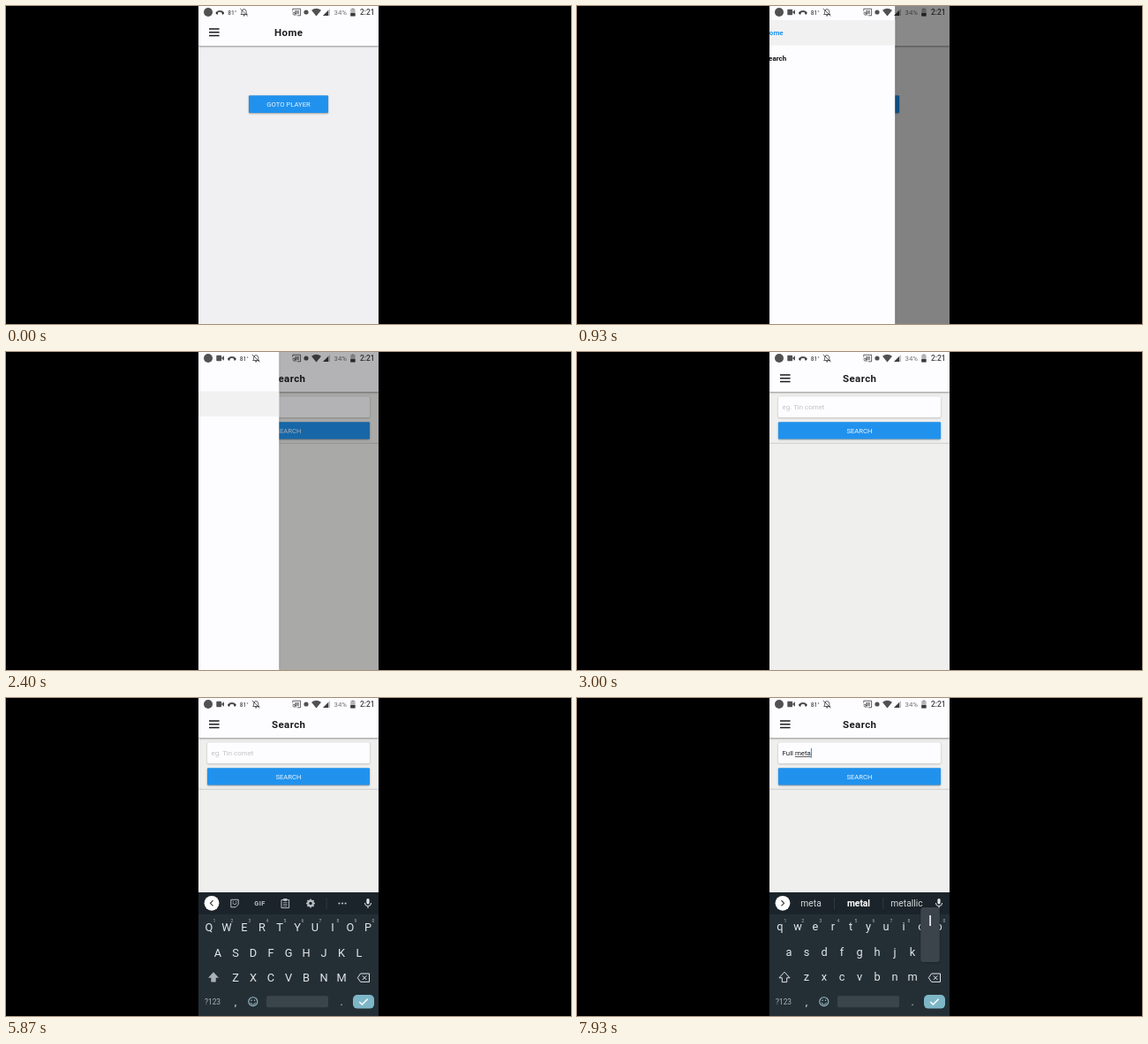
Write an HTML page with a canvas that moves like this. It is 640x360 px and loops after 8000 ms.

```html
<!DOCTYPE html>
<html lang="en">
<head>
<meta charset="utf-8">
<title>Phone search demo</title>
<style>
  html, body { margin: 0; width: 100%; height: 100%; overflow: hidden; background: #000; }
  canvas { display: block; width: 100%; height: 100%; }
</style>
</head>
<body>
<canvas id="stage"></canvas>
<script>
const LOOP = 8000, W = 640, H = 360;
const LEFT = 218, RIGHT = 422, DRAWER = 158;
const BLUE = '#2092ee', PAPER = '#fdfcfe', INK = '#1d1d1f';
const STATUS = 'rgba(0,0,0,.68)';
const KEY = '#e2e6e8', DIM = '#a9b1b5', STRIP = '#1b242a', BOARD = '#242f35';

const canvas = document.getElementById('stage');
const dpr = window.devicePixelRatio || 1;
canvas.width = W * dpr;
canvas.height = H * dpr;
const c = canvas.getContext('2d');

const clamp = v => Math.max(0, Math.min(1, v));
const easeOut = v => 1 - Math.pow(1 - clamp(v), 3);

// Critically damped approach from 0 to 1
function spring(ms, rate) {
  if (ms <= 0) return 0;
  const x = ms / 1000 * rate, left = (1 + x) * Math.exp(-x);
  return left < 0.004 ? 1 : 1 - left;
}

function rect(x, y, w, h, fill, r = 0) {
  c.fillStyle = fill;
  c.beginPath();
  c.roundRect(x, y, w, h, r);
  c.fill();
}

function text(str, x, y, size, fill, { weight = 400, align = 'left', gap = 0 } = {}) {
  c.font = `${weight} ${size}px Roboto, sans-serif`;
  c.letterSpacing = gap + 'px';
  c.textAlign = align;
  c.fillStyle = fill;
  c.fillText(str, x, y);
  c.letterSpacing = '0px';
}

function trace(points, close) {
  c.beginPath();
  for (let i = 0; i < points.length; i += 2) c.lineTo(points[i], points[i + 1]);
  if (close) c.closePath();
}

function line(points, color, width = 1, close = false) {
  trace(points, close);
  c.strokeStyle = color;
  c.lineWidth = width;
  c.stroke();
}

function poly(points, fill) {
  trace(points, true);
  c.fillStyle = fill;
  c.fill();
}

function disc(x, y, r, fill) {
  c.fillStyle = fill;
  c.beginPath();
  c.arc(x, y, r, 0, Math.PI * 2);
  c.fill();
}

function ring(x, y, r, color, width = 1, from = 0, to = Math.PI * 2) {
  c.strokeStyle = color;
  c.lineWidth = width;
  c.beginPath();
  c.arc(x, y, r, from, to);
  c.stroke();
}

function shadowed(blur, drop, alpha, draw) {
  c.save();
  c.shadowColor = `rgba(0,0,0,${alpha})`;
  c.shadowBlur = blur * dpr;
  c.shadowOffsetY = drop * dpr;
  draw();
  c.restore();
}

function statusBar(t) {
  const push = easeOut((t - 40) / 210);
  const x = 13.6 * push;
  disc(229, 7, 5, STATUS);
  if (push > 0) {
    c.globalAlpha = push;
    rect(238.3, 3.8, 5.8, 6.4, STATUS, 0.7);
    poly([244.3, 6.4, 247, 4.2, 247, 9.8, 244.3, 7.6], STATUS);
    c.globalAlpha = 1;
  }
  ring(242.3 + x, 10.2, 4.3, STATUS, 2, Math.PI * 1.13, Math.PI * 1.87);
  line([238.1 + x, 7.6, 239.6 + x, 9.4], STATUS, 1.6);
  line([246.5 + x, 7.6, 245 + x, 9.4], STATUS, 1.6);
  text('81°', 251.2 + x, 9.5, 6.6, STATUS, { weight: 500 });

  const b = 269.6 + x;
  line([b - 3.6, 9.5, b - 2.6, 8.3, b - 2.6, 6, b - 1.3, 3.8, b + 1.3, 3.8,
    b + 2.6, 6, b + 2.6, 8.3, b + 3.6, 9.5], STATUS, 0.9, true);
  line([b - 4.4, 2.8, b + 4.2, 11.4], STATUS, 0.9);
  disc(b, 10.7, 0.9, STATUS);

  line([324.8, 5.5, 324.8, 3.2, 333.6, 3.2, 333.6, 10.8, 330, 10.8], STATUS, 0.9);
  rect(327, 4.8, 5, 4.4, 'rgba(0,0,0,.4)');
  ring(324.6, 10.8, 2, STATUS, 0.9, -Math.PI / 2, 0);
  ring(324.6, 10.8, 3.8, STATUS, 0.9, -Math.PI / 2, 0);
  disc(340, 7, 2.6, STATUS);

  c.fillStyle = STATUS;
  c.beginPath();
  c.moveTo(351.5, 11.4);
  c.lineTo(346, 4.7);
  c.quadraticCurveTo(351.5, 0.9, 357, 4.7);
  c.fill();
  poly([359, 11, 367, 11, 367, 3], 'rgba(0,0,0,.25)');
  poly([359, 11, 365, 11, 365, 5], STATUS);
  text('34%', 371.6, 10, 7.8, 'rgba(0,0,0,.55)');
  rect(391.6, 2.4, 2.6, 1.4, 'rgba(0,0,0,.3)');
  rect(390.2, 3.3, 5.4, 8.2, 'rgba(0,0,0,.28)', 0.5);
  rect(390.2, 8, 5.4, 3.5, STATUS, 0.5);
  text('2:21', 401, 10.1, 8.4, 'rgba(0,0,0,.75)', { weight: 500 });
}

function header(title) {
  shadowed(2, 0.7, 0.4, () => rect(LEFT, 0, RIGHT - LEFT, 45, PAPER));
  for (let i = 0; i < 3; i++) rect(230, 25.2 + i * 3.8, 11.6, 1.5, INK);
  text(title, 320.2, 34.1, 11.5, INK, { weight: 700, align: 'center', gap: 0.4 });
}

function button(x, y, w, h, label) {
  shadowed(2, 0.8, 0.4, () => rect(x, y, w, h, BLUE, 1));
  text(label, x + w / 2, y + h / 2 + 2.8, 7.7, '#eef5fc', { align: 'center' });
}

function homeScreen() {
  rect(LEFT, 0, RIGHT - LEFT, H, '#f0eff1');
  header('Home');
  button(275, 101.2, 90, 19.8, 'GOTO PLAYER');
}

function searchScreen(t, typed) {
  rect(LEFT, 0, RIGHT - LEFT, H, '#efefee');
  rect(LEFT, 102.8, RIGHT - LEFT, 1, '#cdcdcd');
  header('Search');
  shadowed(2, 0.6, 0.32, () => rect(228, 50.2, 184, 24, PAPER, 2));
  const x = 232.5, base = 65;
  let end = x;
  if (typed) {
    text(typed, x, base, 7.9, INK);
    end = x + c.measureText(typed).width;
    const word = typed.lastIndexOf(' ') + 1;
    const from = x + c.measureText(typed.slice(0, word)).width;
    if (end > from) rect(from, 66.1, end - from, 0.7, INK);
  } else {
    text('eg. Tin comet', x, base, 7.9, '#c3c3c6');
  }
  const blink = t < 3870 || (t - 3870) % 1000 >= 460;
  if (t > 3200 && (typed || blink)) rect(end, 57, 1, 10.8, BLUE);
  button(228, 79.2, 184, 19.3, 'SEARCH');
}

function drawer(t, open) {
  if (open <= 0) return;
  const edge = LEFT + DRAWER * open, x = edge - DRAWER;
  rect(LEFT, 0, RIGHT - LEFT, H, `rgba(0,0,0,${0.51 * open})`);
  shadowed(3, 0, 0.35, () => rect(x, 0, DRAWER, H, PAPER));
  const onSearch = t > 2330;
  ['Home', 'Search'].forEach((name, i) => {
    const active = onSearch === (i === 1);
    const y = 16 + i * 28.5;
    if (active || (i === 1 && t > 1130)) {
      rect(x, y, DRAWER, 28.5, active ? '#f1f1f1' : '#f7f7f7');
    }
    text(name, x + 10, y + 17.4, 8, active ? BLUE : '#111', { weight: 700 });
  });
}

// [press time, character]
const PRESSES = [[5970, 'F'], [6180, 'u'], [6390, 'l'], [6590, 'l'], [6770, ' '],
  [6930, 'm'], [7130, 'e'], [7330, 't'], [7530, 'a'], [7870, 'l']];
const COMMIT = 135;
const ROWS = [['qwertyuiop', 230, 259], ['asdfghjkl', 240, 287.5], ['zxcvbnm', 260, 316]];
const HINTS = ['', 'For|From|First', 'Fun|Full|Further', 'Full|Fully|Fuller', 'Full|Fully|Fuller',
  'of|time|moon', 'my|more|me', 'me|men|message', 'met|meet|method', 'meta|metal|metallic'];

function mic() {
  rect(408.4, 227, 3.2, 6.4, KEY, 1.6);
  ring(410, 232, 3.6, KEY, 1, 0, Math.PI);
  line([410, 235.6, 410, 238], KEY);
}

function toolbar() {
  const g = '#b9c0c4';
  line([254.8, 228.3, 263.2, 228.3, 263.2, 233.6, 260, 236.8, 254.8, 236.8], g, 1, true);
  ring(259, 231.7, 2, g, 0.9, 0.2, Math.PI - 0.2);
  disc(257.3, 230.7, 0.6, g);
  disc(260.7, 230.7, 0.6, g);
  text('GIF', 287.5, 235, 7.4, g, { weight: 700, align: 'center', gap: 0.4 });
  line([312, 228.5, 320.6, 228.5, 320.6, 237.6, 312, 237.6], g, 1, true);
  rect(314.2, 227, 4.2, 2.8, g);
  for (let i = 0; i < 3; i++) line([314, 231.6 + i * 1.9, 318.6, 231.6 + i * 1.9], g, 0.7);
  ring(345, 232.5, 2.9, g, 2.2);
  for (let i = 0; i < 8; i++) {
    const a = i * Math.PI / 4, dx = Math.cos(a), dy = Math.sin(a);
    line([345 + 3.5 * dx, 232.5 + 3.5 * dy, 345 + 5 * dx, 232.5 + 5 * dy], g, 1.5);
  }
  rect(362.7, 226, 0.7, 13, '#38434a');
  for (let i = -1; i < 2; i++) disc(381 + i * 3.6, 232.5, 1.1, g);
}

function suggestions(hint) {
  hint.split('|').forEach((word, i) => {
    text(word, [265, 319, 373.5][i], 236.2, 10.3, i === 1 ? '#fff' : '#d5dadd',
      { weight: i === 1 ? 700 : 400, align: 'center' });
  });
  for (const x of [291, 346.5]) rect(x, 226, 0.7, 13, '#38434a');
}

function bottomRow() {
  text('?123', 225, 347, 8.4, DIM);
  text(',', 260, 347.5, 12, KEY, { align: 'center' });
  text('.', 380, 347.5, 12, KEY, { align: 'center' });
  const e = '#9cc0cd';
  ring(279.8, 343.7, 5, e, 1.1);
  ring(279.8, 344.4, 2.7, e, 1, 0.1, Math.PI - 0.1);
  disc(278, 342.2, 0.8, e);
  disc(281.6, 342.2, 0.8, e);
  rect(295, 337.3, 70, 13, '#3a454b', 2);
  rect(393, 336, 24, 15.6, '#7db7c7', 5);
  line([400.3, 344, 403.4, 347, 409.6, 340.8], '#fff', 1.4);
}

function shiftKey(filled) {
  const shape = [235, 310.2, 241, 316.8, 237.7, 316.8, 237.7, 321.6,
    232.3, 321.6, 232.3, 316.8, 229, 316.8];
  if (filled) poly(shape, '#aab2b6');
  else line(shape, KEY, 1, true);
}

function backspace() {
  line([398.3, 316.7, 401.6, 312, 411.5, 312, 411.5, 321.4, 401.6, 321.4], KEY, 1, true);
  line([403.8, 314.4, 408.4, 319], KEY);
  line([408.4, 314.4, 403.8, 319], KEY);
}

function popup(ch) {
  const row = ROWS.find(r => r[0].includes(ch.toLowerCase()));
  if (!row) return;
  const x = row[1] + 20 * row[0].indexOf(ch.toLowerCase());
  shadowed(2, 0.5, 0.4, () => rect(x - 10.8, row[2] - 50.5, 21.6, 62, '#3a444a', 3));
  text(ch, x, row[2] - 29.5, 17, '#fff', { align: 'center' });
}

function keyboard(t, typed) {
  const up = easeOut((t - 3180) / 400);
  if (up <= 0) return;
  c.save();
  c.translate(0, 140 * (1 - up));
  const upper = !typed;
  rect(LEFT, 220, RIGHT - LEFT, 140, BOARD);
  rect(LEFT, 220, RIGHT - LEFT, 25, STRIP);
  disc(233, 232.3, 8.4, '#fff');
  const d = upper ? 1.5 : -1.5;
  line([233 + d, 229.2, 233 - d, 232.3, 233 + d, 235.4], '#333', 1.1);
  if (upper) toolbar();
  else suggestions(HINTS[typed.length]);
  mic();
  for (const [keys, x0, y] of ROWS) {
    [...keys].forEach((k, i) => {
      text(upper ? k.toUpperCase() : k, x0 + 20 * i, y + (upper ? 5.3 : 4.3),
        12.8, KEY, { align: 'center' });
      if (keys.length === 10) {
        text(String((i + 1) % 10), x0 + 20 * i + 6, 254, 5, DIM, { align: 'center' });
      }
    });
  }
  shiftKey(upper);
  backspace();
  bottomRow();
  const down = PRESSES.find(p => t >= p[0] && t < p[0] + COMMIT);
  if (down) popup(down[1]);
  c.restore();
}

function draw(t) {
  c.setTransform(dpr, 0, 0, dpr, 0, 0);
  c.fillStyle = '#000';
  c.fillRect(0, 0, W, H);
  c.save();
  c.beginPath();
  c.rect(LEFT, 0, RIGHT - LEFT, H);
  c.clip();
  const typed = PRESSES.filter(p => t >= p[0] + COMMIT).map(p => p[1]).join('');
  if (t < 2330) homeScreen();
  else searchScreen(t, typed);
  drawer(t, t < 2270 ? spring(t - 530, 9.7) : 1 - spring(t - 2270, 11));
  statusBar(t);
  keyboard(t, typed);
  c.restore();
}

function tick() {
  draw(performance.now() % LOOP);
  requestAnimationFrame(tick);
}
tick();
</script>
</body>
</html>
```
